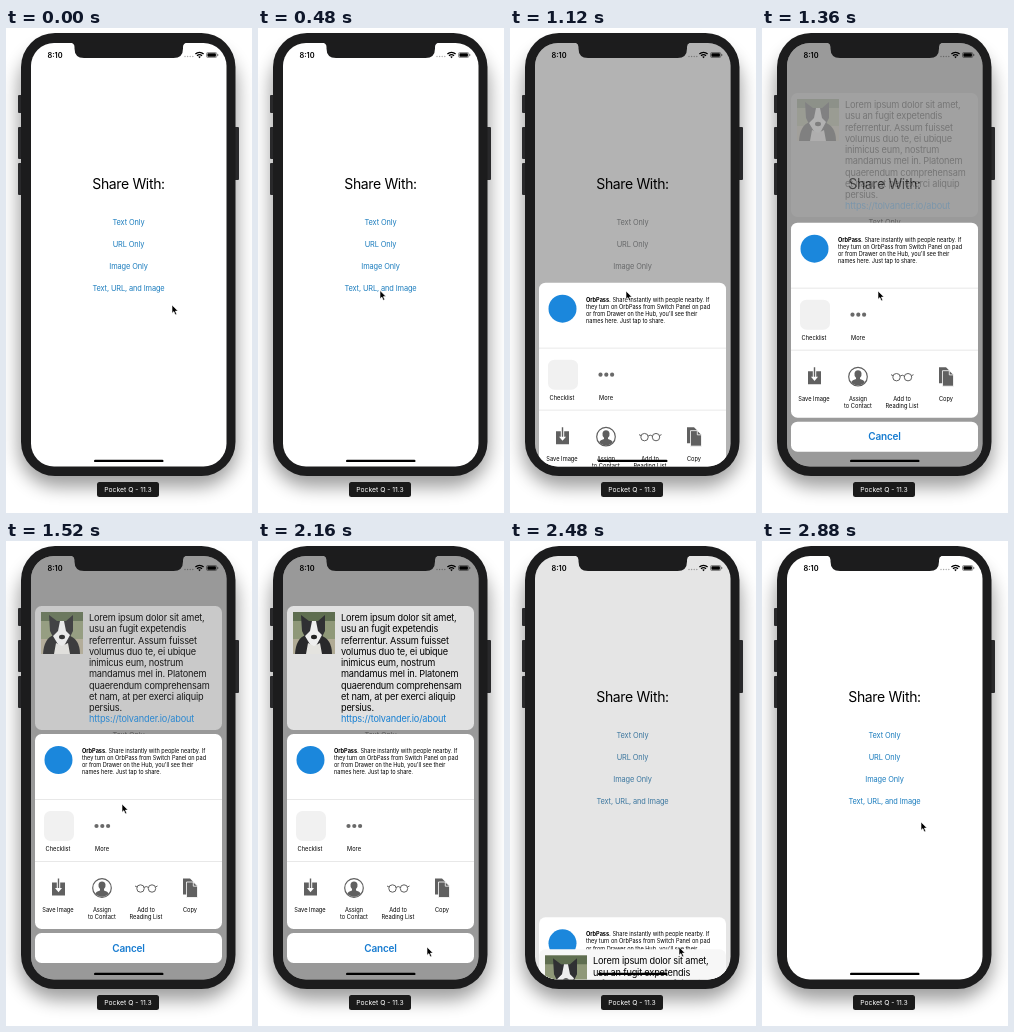
An HTML page for the animation above (2.96 s loop, 246x485 px).

```html
<!DOCTYPE html>
<html lang="en">
<head>
<meta charset="utf-8">
<title>Share sheet</title>
<style>
  html, body { margin: 0; width: 100%; height: 100%; overflow: hidden; background: #fff; }
  svg { display: block; width: 246px; height: 485px; }
  text { font-family: Inter, "Open Sans", sans-serif; }
  .mid { text-anchor: middle; }
  .title { font-size: 14px; letter-spacing: -.025em; }
  .link { font-size: 7.4px; letter-spacing: -.015em; }
  .label { font-size: 5.7px; }
  .note { font-size: 5.6px; letter-spacing: -.005em; }
  .body { font-size: 9.2px; letter-spacing: -.02em; }
</style>
</head>
<body>
<svg viewBox="0 0 246 485">
  <defs>
    <filter id="soft" x="-20%" y="-20%" width="140%" height="140%"><feGaussianBlur stdDeviation="9"/></filter>
    <clipPath id="screen"><rect x="25" y="15" width="195.5" height="423.5" rx="23"/></clipPath>
    <clipPath id="photo"><rect x="35" y="71" width="42" height="42"/></clipPath>
  </defs>

  <rect x="13" y="20" width="218" height="439" rx="38" opacity=".38" filter="url(#soft)"/>
  <g fill="#29292b">
    <rect x="12" y="67" width="5" height="18" rx="1"/>
    <rect x="12" y="99" width="5" height="32" rx="1"/>
    <rect x="12" y="135" width="5" height="32" rx="1"/>
    <rect x="228" y="99" width="5" height="53" rx="1"/>
  </g>
  <rect x="15" y="5" width="214.5" height="443" rx="34" fill="#1c1c1d"/>

  <g clip-path="url(#screen)">
    <rect x="25" y="15" width="196" height="424" fill="#fff"/>
    <text class="title mid" x="122.5" y="161">Share With:</text>
    <g id="links" class="link mid"></g>
    <text x="41.5" y="29.6" font-size="7.4" font-weight="600">8:10</text>
    <g fill="#aaa"><circle cx="179" cy="28.5" r=".7"/><circle cx="181.6" cy="28.5" r=".7"/><circle cx="184.2" cy="28.5" r=".7"/><circle cx="186.8" cy="28.5" r=".7"/></g>
    <g fill="none" stroke="#000" stroke-width="1.3">
      <path d="M189.4 26a5.8 5.8 0 0 1 8.2 0M191 27.8a3.6 3.6 0 0 1 5 0"/>
    </g>
    <path d="M192.2 28.8q1.3-1 2.6 0l-1.3 1.5z"/>
    <rect x="200.5" y="24.5" width="10.3" height="5" rx="1.3" fill="none" stroke="#555" stroke-width=".6"/>
    <rect x="201.4" y="25.3" width="8.5" height="3.4" rx=".6"/>
    <rect x="211.4" y="26" width=".8" height="2" fill="#555"/>

    <rect id="dim" x="25" y="15" width="196" height="424" opacity="0"/>

    <g id="sheet">
      <rect x="29" y="193" width="187" height="195" rx="6.5" fill="#fff"/>
      <path d="M29 258.5h187M29 320.5h187" stroke="#dedede" stroke-width=".7"/>
      <circle cx="52.5" cy="219" r="14" fill="#1b87dc"/>
      <g id="note" class="note"></g>
      <rect x="38" y="270" width="30" height="30" rx="6.5" fill="#f1f1f1"/>
      <g fill="#696969"><circle cx="90.5" cy="285" r="2.1"/><circle cx="96.3" cy="285" r="2.1"/><circle cx="102.1" cy="285" r="2.1"/></g>

      <path d="M46 341.5h13v13H46z" fill="#606060"/>
      <path d="M52.5 339v9" stroke="#fff" stroke-width="3.4"/>
      <path d="M52.5 337.5v10" stroke="#606060" stroke-width="1.4"/>
      <path d="M49 347h7l-3.5 4.2z" fill="#fff"/>

      <circle cx="96" cy="347" r="9.3" fill="none" stroke="#606060" stroke-width="1.2"/>
      <path d="M89.2 352.4q1-2.2 4.8-3v-1.3q-2-2-1.5-4.5.5-3 3.5-3t3.5 3q.5 2.500-1.500 4.500v1.300q3.800.8 4.800 3a8.600 8.600 0 0 1-13.600 0z" fill="#606060"/>

      <g fill="none" stroke="#606060" stroke-width="1">
        <circle cx="134.500" cy="347.500" r="3.700"/><circle cx="146" cy="347.500" r="3.700"/>
        <path d="M138 346.500q2.200-2 4.500 0M131 346l-2-1M149.500 346l2-1"/>
      </g>

      <path d="M177 337.500h7l3 3v13h-10z" fill="#606060"/>
      <path d="M180.500 341h7l4 4v11.500h-11z" fill="#606060" stroke="#fff" stroke-width=".8"/>
      <path d="M187.300 341v4.200h4.200" fill="none" stroke="#fff" stroke-width=".8"/>

      <g id="labels" class="label mid"></g>
      <rect x="29" y="392" width="187" height="30" rx="6.500" fill="#fff"/>
      <text class="mid" x="122.500" y="410.600" font-size="10" font-weight="600" letter-spacing="-.2" fill="#167bd0">Cancel</text>
    </g>

    <g id="card" opacity="0">
      <rect id="cardBack" x="29" y="65" width="187" height="124" rx="6.500"/>
      <g id="cardFront">
        <g clip-path="url(#photo)">
          <rect x="35" y="71" width="42" height="42" fill="#8f9878"/>
          <path d="M35 71h42v9H35z" fill="#5f6e50"/>
          <path d="M35 98h42v15H35z" fill="#b0aa94"/>
          <path d="M37 113q1-16 11-19h14q12 4 12 19z" fill="#29292b"/>
          <path d="M44 90l-1-16 8 6h9l7-6 0 16-6 12H50z" fill="#303033"/>
          <path d="M54 80h4l2 10 4 4-6 11h-5l-6-10 5-5z" fill="#eee"/>
          <path d="M50 102l6 3 6-3 2 11H48z" fill="#e4e3df"/>
          <ellipse cx="56" cy="96" rx="3" ry="2.200" fill="#222"/>
        </g>
        <g id="story" class="body"></g>
      </g>
    </g>
    <rect x="88" y="431.700" width="69.500" height="2.400" rx="1.200"/>
  </g>

  <path d="M64 14.500q4.500.5 4.500 4.500v1.500q0 9.500 9.500 9.500h89.500q9.500 0 9.500-9.500V19q0-4 4.500-4.500z" fill="#1c1c1d"/>
  <rect x="91" y="454" width="62" height="15" rx="2.500" fill="#1a1a1a"/>
  <text class="mid" x="122" y="464.200" font-size="6.800" fill="#fff">Pocket Q - 11.3</text>
  <path id="cursor" d="M0 0v8.300l1.900-1.700 1.300 3.200 1.500-.6-1.300-3.100h2.600z" stroke="#fff" stroke-width=".6"/>
</svg>

<script>
const LOOP = 2960, STEP = 80;
const OPEN_AT = 973, CLOSE_AT = 2333, TRAVEL = 245, STIFFNESS = 0.01826;
const $ = id => document.getElementById(id);

function addText(parent, x, y, text, attrs = {}) {
  const el = document.createElementNS("http://www.w3.org/2000/svg", "text");
  Object.entries({ x, y, ...attrs }).forEach(([k, v]) => el.setAttribute(k, v));
  el.textContent = text;
  return $(parent).appendChild(el);
}

const links = ["Text Only", "URL Only", "Image Only", "Text, URL, and Image"]
  .map((s, i) => addText("links", 122.5, 196.6 + 22 * i, s));

["OrbPass. Share instantly with people nearby. If",
 "they turn on OrbPass from Switch Panel on pad",
 "or from Drawer on the Hub, you'll see their",
 "names here. Just tap to share."
].forEach((s, i) => {
  const el = addText("note", 76, 212 + 7.1 * i, s);
  if (i === 0) el.innerHTML = s.replace("OrbPass.", '<tspan font-weight="700">OrbPass.</tspan>');
});

[[52, 310, "Checklist"], [96, 310, "More"], [52, 371, "Save Image"],
 [96, 371, "Assign"], [96, 378, "to Contact"], [140, 371, "Add to"],
 [140, 378, "Reading List"], [184, 371, "Copy"]
].forEach(args => addText("labels", ...args));

["Lorem ipsum dolor sit amet,", "usu an fugit expetendis", "referrentur. Assum fuisset",
 "volumus duo te, ei ubique", "inimicus eum, nostrum", "mandamus mel in. Platonem",
 "quaerendum comprehensam", "et nam, at per exerci aliquip", "persius.",
 "https://tolvander.io/about"
].forEach((s, i) => addText("story", 83, 80 + 11.25 * i, s, i === 9 ? { fill: "#167fd2" } : {}));

// time, x, y
const cursorPath = [
  [0, 166, 277], [80, 165, 276], [240, 150, 268], [400, 128, 262], [560, 116, 263],
  [1760, 116, 263], [1840, 122, 284], [1920, 140, 330], [2000, 157, 376], [2160, 169, 406],
  [2480, 169, 406], [2560, 166, 392], [2640, 160, 355], [2720, 155, 322], [2800, 154, 301],
  [2880, 159, 281], [2960, 166, 277]
];

const clamp = v => Math.max(0, Math.min(1, v));
const ramp = (t, from, to) => clamp((t - from) / (to - from));
const mix = (a, b, k) => a + (b - a) * k;

// Critically damped spring from 0 to 1.
function spring(ms) {
  if (ms <= 0) return 0;
  const a = ms * STIFFNESS, v = 1 - (1 + a) * Math.exp(-a);
  return v > 0.995 ? 1 : v;
}

function cursorAt(t) {
  const i = cursorPath.findIndex(p => p[0] > t);
  const [t0, x0, y0] = cursorPath[i - 1], [t1, x1, y1] = cursorPath[i];
  const k = (t - t0) / (t1 - t0);
  return [mix(x0, x1, k), mix(y0, y1, k)];
}

function render(t) {
  const closing = t >= CLOSE_AT;
  const shown = closing ? 1 - spring(t - CLOSE_AT) : spring(t - OPEN_AT);
  const offset = TRAVEL * (1 - shown);

  $("dim").setAttribute("opacity", 0.4 * shown);
  $("sheet").setAttribute("transform", `translate(0 ${offset})`);
  $("sheet").setAttribute("visibility", shown ? "visible" : "hidden");

  const grey = clamp(shown * 1.3);
  const tint = [28, 125, 190].map(c => Math.round(mix(c, 150, grey)));
  links.forEach(el => el.setAttribute("fill", `rgb(${tint})`));
  links[3].setAttribute("opacity", t >= 800 && t < 1040 ? 0.65 : 1);

  const visible = shown > 0 && t > 1280;
  const tone = closing ? 247 : Math.round(mix(170, 225, ramp(t, 1340, 1660)));
  $("card").setAttribute("opacity", visible ? ramp(t, 1280, 1480) : 0);
  $("card").setAttribute("transform", `translate(0 ${closing ? offset + 160 : 0})`);
  $("cardBack").setAttribute("fill", `rgb(${tone},${tone},${tone})`);
  $("cardFront").setAttribute("opacity", mix(0.5, 1, ramp(t, 1280, 1600)));

  $("cursor").setAttribute("transform", `translate(${cursorAt(t)})`);
}

function tick() {
  render(Math.floor(performance.now() % LOOP / STEP) * STEP);
  requestAnimationFrame(tick);
}
tick();
</script>
</body>
</html>
```
